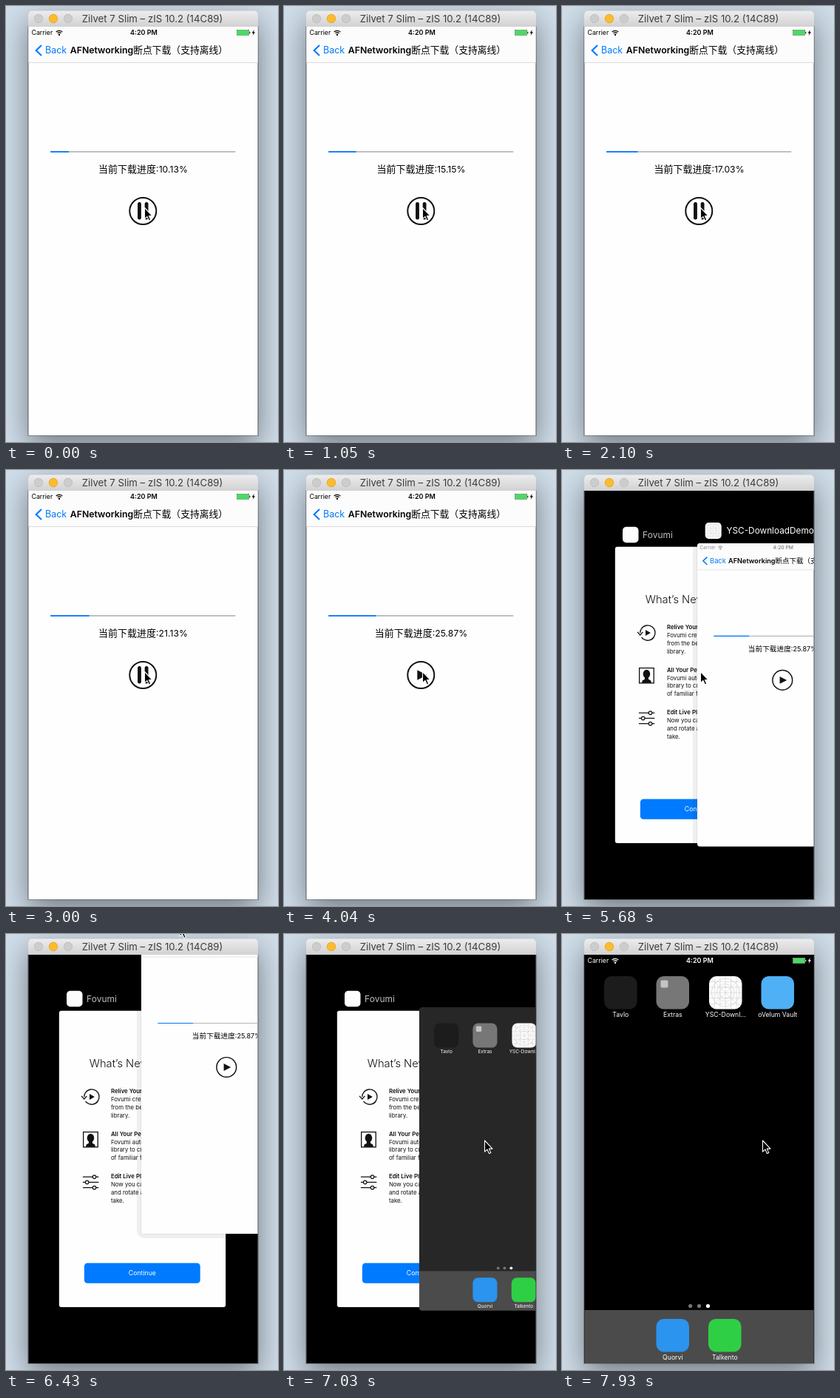
Recreate the animation shown at these times as an HTML page with a canvas. Size 368 px wide and 589 px high, loop 8 s.

```html
<!DOCTYPE html>
<html lang="zh-CN">
<head>
<meta charset="utf-8">
<title>断点下载</title>
<style>
html, body { margin: 0; width: 368px; height: 589px; overflow: hidden; background: #d0deea; }
canvas { display: block; width: 368px; height: 589px; }
</style>
</head>
<body>
<canvas id="stage"></canvas>
<script>
const W = 368, H = 589, LOOP = 8000;
const SX = 30, SY = 28, SW = 311, SH = 552;
const SANS = 'Inter, "Noto Sans CJK SC", "Noto Sans CJK", sans-serif';
const CJK = '"Noto Sans CJK SC", "Noto Sans CJK", sans-serif';
const BLUE = '#007aff', INK = '#111';

const canvas = document.getElementById('stage');
const dpr = window.devicePixelRatio || 1;
canvas.width = W * dpr;
canvas.height = H * dpr;
const c = canvas.getContext('2d');

// Keyframes: rows of [time, value, ...], linear between rows
const PROGRESS = [[0, 10.13], [1050, 15.15], [1500, 16.98], [2099, 16.98], [2100, 17.03],
  [2250, 17.03], [3000, 21.13], [3300, 22.79], [3900, 25.48], [4040, 25.87]];
const SWITCH = [[5380, 0.558], [5530, 0.9], [5680, 1], [7630, 1], [7780, 0.5], [7930, 0]];
const LIFT = [[6280, 0], [6430, 103.9], [6580, 340], [6730, 620]];
const HOME_IN = [[6580, 0], [6730, 0.5], [6880, 0.87], [7030, 1]];
const POINTER = [[5680, 187.5, 272.5], [6130, 236, 300], [6280, 238, 230], [6430, 235, -12],
  [6580, 248, 20], [6730, 262, 170], [6880, 270, 262], [7030, 271.5, 279]];

function at(keys, t) {
  let i = 0;
  while (i < keys.length && keys[i][0] <= t) i++;
  if (i === 0) return keys[0].slice(1);
  if (i === keys.length) return keys[i - 1].slice(1);
  const a = keys[i - 1], b = keys[i], k = (t - a[0]) / (b[0] - a[0]);
  return a.slice(1).map((v, n) => v + (b[n + 1] - v) * k);
}

// The screen refreshes every 150 ms
function tick(t) {
  if (t < 4040) return Math.floor(t / 150) * 150;
  if (t < 5380) return 4040;
  return 5380 + Math.floor((t - 5380) / 150) * 150;
}

const mix = (a, b, k) => a + (b - a) * k;

function box(x, y, w, h, r, fill) {
  c.beginPath();
  c.roundRect(x, y, w, h, r);
  c.fillStyle = fill;
  c.fill();
}

function disc(x, y, r, fill) {
  c.beginPath();
  c.arc(x, y, r, 0, Math.PI * 2);
  c.fillStyle = fill;
  c.fill();
}

function ring(x, y, r, width, color, from = 0, to = Math.PI * 2) {
  c.beginPath();
  c.arc(x, y, r, from, to);
  c.lineWidth = width;
  c.strokeStyle = color;
  c.stroke();
}

function poly(points, fill) {
  c.beginPath();
  points.forEach(([x, y]) => c.lineTo(x, y));
  c.closePath();
  c.fillStyle = fill;
  c.fill();
}

function line(points, width, color) {
  c.beginPath();
  points.forEach(([x, y]) => c.lineTo(x, y));
  c.lineWidth = width;
  c.strokeStyle = color;
  c.stroke();
}

function text(s, x, y, size, color, align = 'left', weight = 400, family = SANS) {
  c.font = `${weight} ${size}px ${family}`;
  c.textAlign = align;
  c.fillStyle = color;
  c.fillText(s, x, y);
  return c.measureText(s).width;
}

function desktop() {
  c.fillStyle = '#d0deea';
  c.fillRect(0, 0, W, H);
  c.save();
  c.shadowColor = 'rgba(0,0,0,.46)';
  c.shadowBlur = 42 * dpr;
  c.shadowOffsetY = 14 * dpr;
  box(SX, 7, SW, 573, [5, 5, 0, 0], '#888');
  c.restore();
  c.strokeStyle = 'rgba(0,0,0,.25)';
  c.lineWidth = 1;
  c.strokeRect(SX - 0.5, SY, SW + 1, SH + 0.5);
  const g = c.createLinearGradient(0, 7, 0, 28);
  g.addColorStop(0, '#ececec');
  g.addColorStop(1, '#d1d1d1');
  box(SX, 6.5, SW, 21.5, [5, 5, 0, 0], g);
  [[44, '#cdcdcd', '#b9b9b9'], [64, '#fdbc2e', '#dfa023'], [84, '#cdcdcd', '#b9b9b9']].forEach(([x, fill, edge]) => {
    disc(x, 17, 6, fill);
    ring(x, 17, 5.7, 0.7, edge);
  });
  text('Zilvet 7 Slim – zIS 10.2 (14C89)', 198, 22, 13.2, '#3c3c3c', 'center');
}

// Everything on the device is laid out in a 311 x 552 space
function statusBar(color) {
  text('Carrier', 4.5, 11.2, 8.8, color);
  disc(42, 10.7, 1.2, color);
  [3.4, 5.9].forEach(r => ring(42, 11.2, r, 1.3, color, -Math.PI * 0.76, -Math.PI * 0.24));
  text('4:20 PM', 156.5, 11.2, 9, color, 'center', 600);
  c.strokeStyle = color;
  c.lineWidth = 0.4;
  c.strokeRect(282.2, 4.3, 16.6, 7.4);
  c.fillStyle = '#4cd964';
  c.fillRect(282.6, 4.6, 15.8, 6.8);
  box(299.3, 6.5, 1, 3, 0.5, color);
  poly([[306, 4], [302.6, 8.6], [304.6, 8.6], [303.6, 12], [307, 7.2], [305, 7.2]], color);
}

function roundButton(paused) {
  const x = 155.3, y = 249;
  ring(x, y, 18, 2, INK);
  if (paused) {
    poly([[x - 5, y - 6.7], [x + 8, y], [x - 5, y + 6.7]], INK);
  } else {
    box(x - 7.2, y - 12, 4.8, 23.5, 2.2, INK);
    box(x + 2.4, y - 12, 4.8, 23.5, 2.2, INK);
  }
}

function downloadApp(t, dim) {
  c.fillStyle = '#fefefe';
  c.fillRect(0, 0, SW, SH);
  c.fillStyle = '#fcfcfc';
  c.fillRect(0, 0, SW, 48.5);
  c.fillStyle = '#d4d4d4';
  c.fillRect(0, 48, SW, 0.8);
  c.globalAlpha = 1 - 0.55 * dim;
  statusBar('#000');
  c.globalAlpha = 1;
  line([[18, 25], [10.7, 32], [18, 39]], 2.1, BLUE);
  text('Back', 23, 36.4, 12.5, BLUE);
  const w = text('AFNetworking', 56.7, 36.4, 12.3, '#000', 'left', 600);
  text('断点下载（支持离线）', 56.7 + w, 36.4, 12.8, '#000', 'left', 500, CJK);

  const p = at(PROGRESS, t)[0];
  box(30, 168.1, 250.5, 1.6, 0.8, '#b7b7b7');
  box(30, 168.1, 2.5 * p, 1.6, 0.8, BLUE);
  const label = '当前下载进度', value = ':' + p.toFixed(2) + '%';
  c.font = `400 13px ${CJK}`;
  const lw = c.measureText(label).width;
  c.font = `400 12.2px ${SANS}`;
  const x = 155.5 - (lw + c.measureText(value).width) / 2;
  text(label, x, 197, 13, '#000', 'left', 400, CJK);
  text(value, x + lw, 197, 12.2, '#000');
  roundButton((t >= 1500 && t < 2100) || t >= 4040);
}

const NEWS = [
  ['Relive Your Memories', 'Fovumi creates memories', 'from the best of your', 'library.'],
  ['All Your People in Place', 'Fovumi automatically scans your', 'library to create albums', 'of familiar faces.'],
  ['Edit Live Plates', 'Now you can trim, filter', 'and rotate any plate you', 'take.']
];

function galleryApp() {
  c.fillStyle = '#fefefe';
  c.fillRect(0, 0, SW, SH);
  text('What’s New in Fovumi', 56.7, 105.5, 20.2, INK, 'left', 300);
  NEWS.forEach((rows, n) => rows.forEach((s, i) =>
    text(s, 96.8, 153.7 + n * 79.4 + i * 15, 10.8, INK, 'left', i ? 400 : 600)));

  // history
  ring(61, 160.6, 14, 1.9, INK, -Math.PI * 0.8, Math.PI * 0.8);
  ring(61, 160.6, 14, 1.9, INK, Math.PI, Math.PI * 1.2);
  line([[42, 159], [47, 164.5], [52, 159]], 1.9, INK);
  poly([[57, 155], [66.5, 160.6], [57, 166]], INK);

  // portrait
  c.strokeStyle = INK;
  c.lineWidth = 1.8;
  c.strokeRect(45.5, 226, 27, 28);
  c.beginPath();
  c.ellipse(59, 237, 6.6, 8, 0, 0, Math.PI * 2);
  c.fillStyle = INK;
  c.fill();
  c.fillRect(55.5, 241, 7, 7);
  poly([[50, 254], [51, 249.5], [56, 246.5], [62, 246.5], [67, 249.5], [68, 254]], INK);

  // sliders
  [[309.5, 66], [319.5, 52.5], [329.5, 66]].forEach(([y, x]) => {
    line([[44.5, y], [74, y]], 1.8, INK);
    disc(x, y, 3.1, '#fff');
    ring(x, y, 3.1, 1.6, INK);
  });

  box(47.2, 469.8, 216, 37.5, 6, BLUE);
  text('Continue', 155.3, 493, 12, '#fff', 'center');
}

function gridIcon(x, y, s) {
  c.save();
  c.translate(x, y);
  c.scale(s / 45, s / 45);
  box(0, 0, 45, 45, 10, '#fdfdfd');
  c.beginPath();
  c.roundRect(0, 0, 45, 45, 10);
  c.clip();
  const ink = '#c6cbc6';
  [7.5, 15, 22.5, 30, 37.5].forEach(v => {
    line([[v, 0], [v, 45]], 0.5, ink);
    line([[0, v], [45, v]], 0.5, ink);
  });
  line([[0, 0], [45, 45]], 0.5, ink);
  line([[45, 0], [0, 45]], 0.5, ink);
  [8, 12, 19].forEach(r => ring(22.5, 22.5, r, 0.6, ink));
  c.restore();
}

function homeScreen(open) {
  const v = Math.round(mix(39, 0, open));
  c.fillStyle = `rgb(${v},${v},${v})`;
  c.fillRect(0, 0, SW, SH);
  c.fillStyle = '#4b4b4b';
  c.fillRect(0, 480, SW, 72);
  c.globalAlpha = open;
  statusBar('#fff');
  c.globalAlpha = 1;
  [[27, 29, '#1c1c1c', 'Tavlo'], [97.5, 29, '#777', 'Extras'], [169, 29, '', 'YSC-Downl...'],
   [239.5, 29, '#4fb0f5', 'oVelum Vault'], [97.5, 492, '#2a94ee', 'Quorvi'], [168, 492, '#2fcf45', 'Talkento']
  ].forEach(([x, y, fill, name]) => {
    if (fill) box(x, y, 44.5, 44.5, 10, fill);
    else gridIcon(x, y, 44.5);
    text(name, x + 22.3, y + 54.8, 8.7, '#fff', 'center');
  });
  box(103.5, 34.5, 10, 10, 2, '#c4c4c4');
  [143.7, 155.5, 167.5].forEach((x, i) => disc(x, 474.5, 2.6, i === 2 ? '#fff' : '#777'));
}

function card(x, y, s, radius, shadow, paint) {
  const w = SW * s, h = SH * s;
  c.save();
  if (shadow) {
    box(x - 6, y - 6, w + 12, h + 12, 10, 'rgba(0,0,0,.06)');
    box(x - 1, y - 1, w + 2, h + 2, radius + 1, 'rgba(0,0,0,.06)');
  }
  c.beginPath();
  c.roundRect(x, y, w, h, radius);
  c.clip();
  c.translate(x, y);
  c.scale(s, s);
  paint();
  c.restore();
}

function galleryCard(q) {
  const x = mix(SX, 71.6, q), y = mix(SY, 103.4, q);
  card(x, y, mix(1, 0.7262, q), 4 * q, false, galleryApp);
  const iy = y - mix(29, 26.7, q);
  box(x + 10.4, iy, 21.5, 21.5, 5, '#fdfdfd');
  const v = Math.round(mix(110, 190, Math.max(0, (q - 0.5) * 2)));
  text('Fovumi', x + 37.5, iy + 15, 12, `rgb(${v},${v},${v})`);
}

function pointer(x, y) {
  const pts = [[0, 0], [0, 15.2], [3.5, 12], [6, 17.6], [8.3, 16.6], [5.9, 11.1], [10.5, 11.1]];
  c.save();
  c.translate(x, y);
  poly(pts, '#000');
  c.lineWidth = 1.1;
  c.lineJoin = 'round';
  c.strokeStyle = '#fff';
  c.stroke();
  c.restore();
}

function draw(time) {
  const t = tick(time);
  c.setTransform(dpr, 0, 0, dpr, 0, 0);
  desktop();
  c.save();
  c.beginPath();
  c.rect(SX + 0.4, SY, SW - 0.8, SH);
  c.clip();
  c.fillStyle = '#000';
  c.fillRect(SX, SY, SW, SH);

  if (t < 5380) {
    card(SX, SY, 1, 0, false, () => downloadApp(t, 0));
  } else {
    const q = at(SWITCH, t)[0];
    const x = mix(SX, 183, q), y = mix(SY, 99, q), s = mix(1, 0.7425, q);
    if (q > 0) galleryCard(q);
    if (t < 6730) {
      const top = y - at(LIFT, t)[0];
      card(x, top, s, 4 * q, true, () => downloadApp(t, 1));
      gridIcon(x + 10.7, top - 28, 22);
      text('YSC-DownloadDemo', x + 39.5, top - 12.7, 11.8, '#fff');
    } else {
      const slide = (1 - at(HOME_IN, t)[0]) * 160;
      card(x + slide, y, s, 4 * q, false, () => homeScreen(1 - q));
    }
  }
  c.restore();
  pointer(...at(POINTER, t));
}

function loop() {
  draw(performance.now() % LOOP);
  requestAnimationFrame(loop);
}
loop();
</script>
</body>
</html>
```
